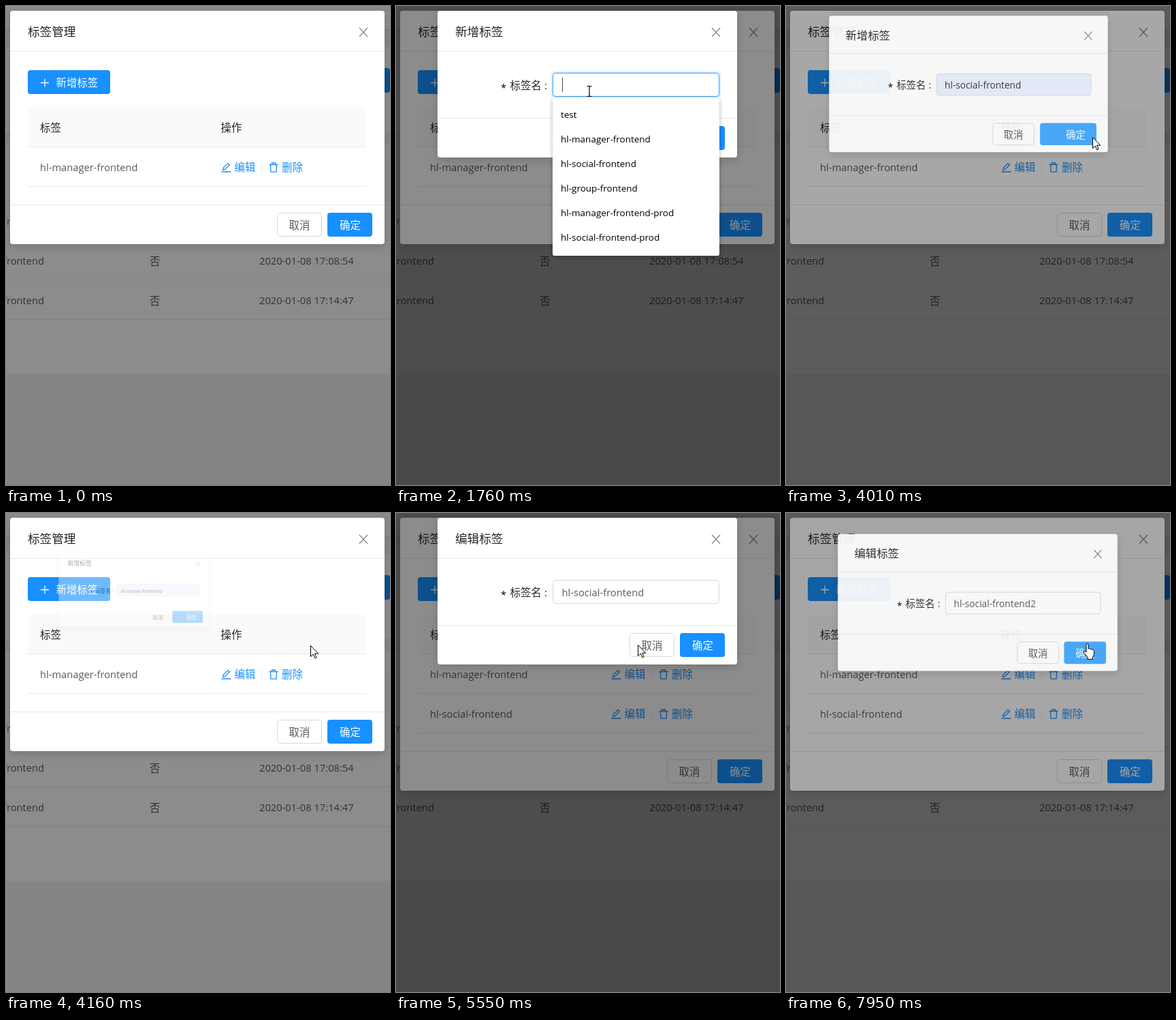
Recreate the animation shown at these times as an HTML page. Size 564 by 702 pixels, loop 8 s.

```html
<!DOCTYPE html>
<html lang="zh">
<head>
<meta charset="utf-8">
<title>标签管理</title>
<style>
html, body { margin: 0; width: 100%; height: 100%; overflow: hidden; background: #848587; }
svg { display: block; }
text { font: 14.7px "Open Sans", "Noto Sans CJK SC", "Noto Sans CJK", sans-serif; fill: rgba(0,0,0,.65); white-space: pre; }
.cn { font-size: 15.4px; }
.title { font-size: 17.6px; }
.dark { fill: rgba(0,0,0,.85); }
.white { fill: #fff; }
.link { fill: #1890ff; }
.opt { font-size: 13.5px; fill: #000; }
.icon { fill: none; stroke: #1890ff; stroke-width: 1.3; }
.cross { fill: none; stroke: rgba(0,0,0,.45); stroke-width: 1.4; }
.cursor { fill: #fff; stroke: #000; stroke-width: 1; stroke-linejoin: round; }
.modal { filter: drop-shadow(0 4px 6px rgba(0,0,0,.15)); }
.menu { filter: drop-shadow(0 2px 3px rgba(0,0,0,.3)); }
</style>
</head>
<body>
<svg id="stage" width="564" height="702" viewBox="0 0 564 702"></svg>
<script>
const LOOP = 8000, STEP = 77.2, BLUE = '#1890ff', LIGHT = '#40a9ff';
const TAGS = ['test', 'hl-manager-frontend', 'hl-social-frontend', 'hl-group-frontend',
  'hl-manager-frontend-prod', 'hl-social-frontend-prod'];
const SOCIAL = TAGS[2];

// markup helpers
const rect = (x, y, w, h, fill, more = '') =>
  `<rect x="${x}" y="${y}" width="${w}" height="${h}" fill="${fill}" ${more}/>`;
const text = (x, y, str, cls = '', more = '') => `<text x="${x}" y="${y}" class="${cls}" ${more}>${str}</text>`;
const line = (x, y, w, color = '#e8e8e8') => rect(x, y, w, 1, color);
const group = (id, body, more = '') => `<g id="${id}" ${more}>${body}</g>`;
const at = (x, y, body) => `<g transform="translate(${x} ${y})">${body}</g>`;
const cross = (x, y) => `<path class="cross" d="M${x - 6} ${y - 6.5}l12 13m0-13l-12 13"/>`;
const cancel = (x, y) =>
  rect(x + .5, y + .5, 65, 34, '#fff', 'rx="4" stroke="#d9d9d9"') + text(x + 17.5, y + 24, '取消', 'cn');

const page = () => {
  let s = rect(0, 0, 564, 702, '#f0f2f5') + rect(0, 0, 564, 34, '#fff') + line(0, 34, 564, '#ddd')
    + rect(0, 60, 564, 124, '#fff') + rect(0, 203, 564, 336, '#fff')
    + rect(0, 228, 564, 57, '#fafafa') + rect(540, 91, 24, 36, BLUE, 'rx="4"');
  [285, 343, 401, 459].forEach(y => s += line(0, y, 564));
  ['', '17:08:54', '17:14:47'].forEach((time, i) => {
    const y = 321 + i * 58;
    s += text(56, y, 'frontend', i ? '' : 'link', 'text-anchor="end"');
    if (time) s += text(211, y + .5, '否', 'cn') + text(372, y, '2020-01-08 ' + time);
  });
  return s;
};

const row = (id, y, tag) => group(id,
  rect(32, y, 497, 57, '#e6f7ff', `id="${id}Bg"`) + line(32, y + 57, 497) + text(50, y + 35, tag)
  + `<g id="${id}Edit">`
  + at(316, y + 22, '<path class="icon" d="M2.5 11.3l.7-3.2L10 1.3l2.4 2.4-6.8 6.8zM.5 14h14"/>')
  + text(335.5, y + 35, '编辑', 'cn link') + '</g>'
  + rect(375, y + 23, 1, 14, '#e8e8e8')
  + at(386, y + 22, '<path class="icon" d="M.5 3.5h13M4.5 3.5V1h5v2.5M2.5 3.5l.5 10.7h8l.5-10.7"/>')
  + text(405, y + 35, '删除', 'cn link'));

const list = () =>
  rect(6, 7, 550, 342, '#fff', 'id="panel" rx="4" class="modal"')
  + text(32, 44, '标签管理', 'title dark') + cross(525, 38.5) + line(6, 66, 550)
  + rect(31, 93, 123, 37, 'none', `id="wave" rx="5" stroke="${BLUE}" stroke-width="3"`)
  + rect(32, 94, 121, 35, BLUE, 'id="add" rx="4"')
  + '<path d="M51 112.5h12m-6-6v12" stroke="#fff" stroke-width="1.3"/>' + text(73.5, 118, '新增标签', 'cn white')
  + rect(32, 149, 497, 57, '#fafafa', 'rx="4"') + line(32, 206, 497)
  + text(50, 184, '标签', 'cn dark') + text(315.5, 184, '操作', 'cn dark')
  + row('row1', 207, TAGS[1]) + row('row2', 265, SOCIAL)
  + group('foot', line(6, 291, 550) + cancel(398, 303)
    + rect(472, 303, 66, 35, BLUE, 'rx="4"') + text(490, 327, '确定', 'cn white'));

const form = () =>
  rect(61, 7, 440, 215, '#fff', 'rx="4" class="modal"')
  + text(87, 44, '', 'title dark', 'id="formTitle"') + cross(470, 38.5) + line(61, 66, 440)
  + text(154, 125, '*', '', 'style="fill:#000"') + text(167.5, 122, '标签名', 'cn dark') + text(218, 121.5, ':', 'dark')
  + rect(229, 97, 247, 37, 'none', `id="halo" rx="5" stroke="${BLUE}" stroke-opacity=".22" stroke-width="2"`)
  + rect(230.5, 98.5, 244, 34, '#fff', 'id="field" rx="4"')
  + text(243.5, 122, '', '', 'id="value"') + rect(244, 105, 1, 21, '#444', 'id="caret"')
  + line(61, 164, 440) + group('no', cancel(343, 176))
  + rect(417, 176, 66, 35, BLUE, 'id="ok" rx="4"') + text(435, 200, '确定', 'cn white')
  + group('menu', rect(230, 134, 245, 232, '#fff', 'id="menuBox" rx="3" class="menu"')
    + rect(230, 141, 245, 36, '#eee', 'id="pick"') + group('opts', ''));

const pointers =
  '<path id="arrow" class="cursor" d="M.5 .5v16l3.7-3.5 2.6 5.8 2.3-1-2.6-5.6h5.2z"/>'
  + '<path id="hand" class="cursor" d="M-1 13V2Q-1 .5 .5 .5T2 2v6q1.7-1 3 .5 1.6-.8 2.8.6Q10.5 9 10.5 11.300v5l-2 4v3H1v-3l-5.600-6.600Q-5.500 11-3.500 11.500z"/>'
  + '<path id="beam" d="M-3.500-7.500h2.500l1 1 1-1h2.500M0-7V7M-3.500 7.500h2.500l1-1 1 1h2.500" fill="none" stroke="#000" stroke-width="1.200"/>';

document.getElementById('stage').innerHTML = page() + rect(0, 0, 564, 702, 'rgba(0,0,0,.45)') + list()
  + rect(0, 0, 564, 702, '#000', 'id="mask"') + group('form', form()) + group('cursor', pointers);

const $ = id => document.getElementById(id);
const set = (id, props) => Object.entries(props).forEach(([k, v]) => $(id).setAttribute(k, v));
const show = (id, on) => set(id, { visibility: on ? 'inherit' : 'hidden' });
const ramp = (t, start, length) => Math.min(1, Math.max(0, (t - start) / length));
const within = (t, a, b) => t >= a && t < b;

function bezier(x1, y1, x2, y2) {
  const curve = (a, b, s) => 3 * (1 - s) ** 2 * s * a + 3 * (1 - s) * s * s * b + s ** 3;
  return x => {
    let lo = 0, hi = 1;
    for (let i = 0; i < 24; i++) {
      const mid = (lo + hi) / 2;
      if (curve(x1, x2, mid) < x) lo = mid; else hi = mid;
    }
    return curve(y1, y2, lo);
  };
}
const zoomIn = bezier(.08, .82, .17, 1), zoomOut = bezier(.6, .04, .98, .34);

// form sessions: opening, closing and input events in ms
const SESSIONS = [
  { title: '新增标签', open: 870, close: 3880, ox: 94, oy: 111, focus: 1600, menu: 1680, menuEnd: 2850, blur: 3690, load: 3690 },
  { title: '编辑标签', open: 5190, close: 7820, ox: 288, oy: 363, focus: 6300, menu: 6320, menuEnd: 6780, blur: 7780, load: 9e9 }
];

// pointer path: time, x, y
const PATH = [
  [70, 450, 598], [300, 395, 455], [650, 140, 160], [840, 107, 115], [990, 107, 115],
  [1600, 284, 125], [1800, 284, 125], [2160, 294, 200], [2390, 290, 232], [2680, 290, 232],
  [2685, 299, 226], [2850, 299, 226], [3560, 450, 192], [4050, 450, 192], [4470, 430, 206],
  [4800, 355, 280], [5080, 342, 296], [5240, 342, 296], [5900, 370, 70], [6080, 378, 34],
  [6300, 383, 114], [7020, 383, 114], [7700, 442, 191], [8000, 442, 191]
];

function pointAt(t) {
  const i = Math.max(1, PATH.findIndex(p => p[0] >= t));
  const [a, b] = [PATH[i - 1], PATH[i]];
  const u = ramp(t, a[0], b[0] - a[0]), e = u * u * (3 - 2 * u);
  return [a[1] + (b[1] - a[1]) * e, a[2] + (b[2] - a[2]) * e];
}

function drawForm(t, s, overOk) {
  const leaving = t >= s.close;
  const grow = leaving ? 1 - zoomOut(ramp(t, s.close, 300)) : zoomIn(ramp(t, s.open, 300));
  const scale = .2 + .8 * grow;
  set('form', {
    opacity: grow,
    transform: `translate(${s.ox * (1 - scale)} ${s.oy * (1 - scale)}) scale(${scale})`
  });
  set('mask', { opacity: .45 * (ramp(t, s.open, 200) - ramp(t, s.close + 80, 200)) });
  $('formTitle').textContent = s.title;

  const adding = s === SESSIONS[0];
  const filled = adding && t >= s.menuEnd;
  const menuOpen = within(t, s.menu, s.menuEnd);
  const pick = !adding || t < 1980 ? -1 : t < 2070 ? 0 : t < 2290 ? 1 : 2;
  const value = adding ? (filled ? SOCIAL : TAGS[pick] || '') : SOCIAL + (t >= s.menuEnd ? '2' : '');
  const focus = within(t, s.focus, s.blur);
  $('value').textContent = value;
  $('value').style.fill = adding ? 'rgba(0,0,0,.8)' : '';
  show('halo', focus);
  set('field', { stroke: focus ? LIGHT : '#d9d9d9', fill: adding && value ? '#e8f0fe' : '#fff' });
  show('caret', focus && (adding ? !value && (t - 1680) % 1060 < 530 : (t - 6320) % 1060 < 530));
  set('caret', { x: 244 + $('value').getComputedTextLength() });

  const loading = t >= s.load;
  set('no', { transform: `translate(${loading ? -24 : 0} 0)` });
  set('ok', { x: loading ? 394 : 417, width: loading ? 89 : 66, fill: loading || overOk ? LIGHT : BLUE });

  show('menu', menuOpen);
  if (menuOpen) {
    const opts = adding ? TAGS : [SOCIAL, TAGS[5]];
    set('menuBox', { height: opts.length * 36 + 16 });
    set('pick', { y: 141 + pick * 36, opacity: pick < 0 ? 0 : 1 });
    $('opts').innerHTML = opts.map((o, i) => text(242, 164 + i * 36, o, 'opt')).join('');
  }
}

function draw(t) {
  const session = SESSIONS.find(s => within(t, s.open, s.close + 300));
  const [x, y] = pointAt(t);
  const over = (l, top, r, b) => within(x, l, r) && within(y, top, b);
  const overOk = session && over(417, 176, 483, 211);
  const overLink = !session && (over(32, 94, 153, 129) || (t >= 4470 && over(316, 285, 367, 305)));

  const added = t >= 4200;
  show('row2', added);
  set('panel', { height: added ? 400 : 342 });
  set('foot', { transform: `translate(0 ${added ? 58 : 0})` });
  set('row1Bg', { opacity: ramp(t, 4480, 200) - ramp(t, 4700, 300) });
  set('row2Bg', { opacity: ramp(t, 4700, 300) - ramp(t, 5190, 200) });
  set('row2Edit', { opacity: overLink && t > 4470 ? .8 : 1 });
  set('add', { fill: within(t, 740, 1000) || within(t, 4180, 5250) ? LIGHT : BLUE });
  set('wave', { opacity: t < 840 ? 0 : .4 * (1 - ramp(t, 840, 400)) });

  show('form', !!session);
  show('mask', !!session);
  if (session) drawForm(t, session, overOk);

  const typing = session && t > session.open + 200 && over(230, 98, 475, 133);
  const kind = typing ? 'beam' : overLink || (overOk && t < session.load) ? 'hand' : 'arrow';
  ['arrow', 'hand', 'beam'].forEach(id => show(id, id === kind));
  show('cursor', t >= 70);
  set('cursor', { transform: `translate(${Math.round(x)} ${Math.round(y)})` });
}

let last = null;
function tick() {
  const k = Math.floor((performance.now() % LOOP - 55) / STEP);
  if (k !== last) draw(70 + k * STEP);
  last = k;
  requestAnimationFrame(tick);
}
tick();
</script>
</body>
</html>
```
